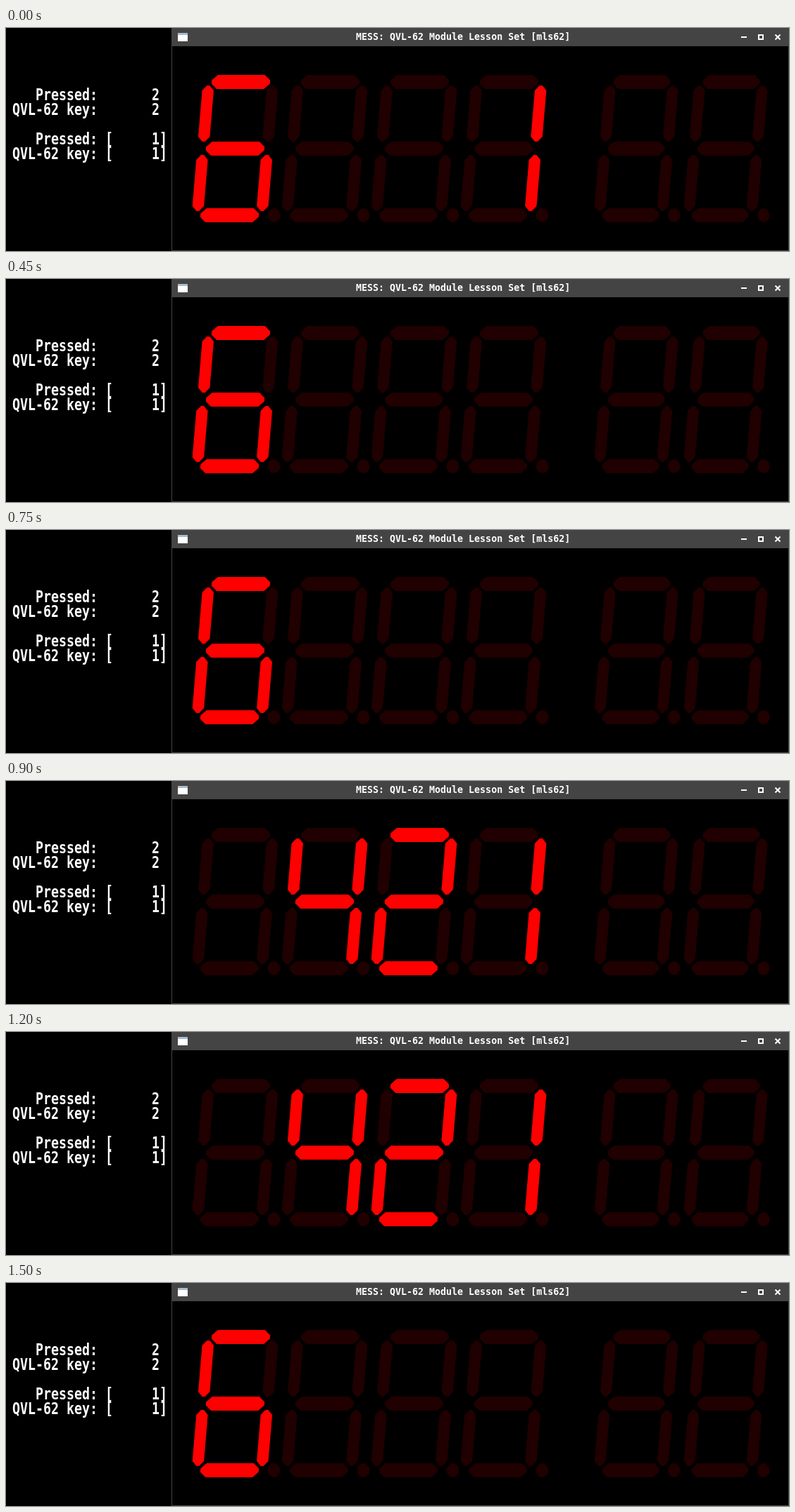
These frames come from a looping animation (1112x318 px, 1.65 s). An HTML page with a canvas:

```html
<!DOCTYPE html>
<html lang="en">
<head>
<meta charset="utf-8">
<title>Seven-segment display</title>
<style>
  html, body { margin: 0; height: 100%; overflow: hidden; background: #000; }
  canvas { display: block; }
</style>
</head>
<body>
<canvas id="stage" width="1112" height="318"></canvas>
<script>
const ctx = document.getElementById('stage').getContext('2d');
const STEP = 150;
const LIT = '#ff0000', DIM = '#200000';
const MONO = '"DejaVu Sans Mono", monospace';

// Four address digits, then two slightly narrower data digits
const places = [
  ...[325.5, 452.5, 579.5, 706.5].map(x => ({ x, width: 1 })),
  ...[895.1, 1022.1].map(x => ({ x, width: 0.975 }))
];
const digits = ['6', '4', '2', '1'];
const glyphs = { 6: 'acdefg', 4: 'bcfg', 2: 'abdeg', 1: 'bc' };

// Which digits the multiplexed display shows at each step
const scan = ['03', '0', '23', '0', '123', '0', '123', '0', '123', '23', '0'];

// Segment centres relative to the digit centre, before the slant
const segments = {
  a: [0, -95], g: [0, 0], d: [0, 95],
  f: [-45.7, -50], b: [45.7, -50],
  e: [-45.7, 49], c: [45.7, 49]
};

function bar(x, y, horizontal) {
  const [half, thick, cap, tip] = horizontal ? [41.5, 10, 8, 2.5] : [40, 8.2, 7, 2];
  const corners = [
    [-half, -tip], [cap - half, -thick], [half - cap, -thick], [half, -tip],
    [half, tip], [half - cap, thick], [cap - half, thick], [-half, tip]
  ];
  ctx.beginPath();
  for (const [u, v] of corners) {
    ctx.lineTo(x + (horizontal ? u : v), y + (horizontal ? v : u));
  }
  ctx.fill();
}

function drawDigit({ x, width }, lit) {
  ctx.save();
  ctx.transform(width, 0, -0.084, 1, x, 172);
  for (const name in segments) {
    ctx.fillStyle = lit.includes(name) ? LIT : DIM;
    bar(...segments[name], 'agd'.includes(name));
  }
  ctx.restore();
  ctx.fillStyle = DIM;
  ctx.beginPath();
  ctx.ellipse(x + 55 * width, 267, 9 * width, 10, 0, 0, Math.PI * 2);
  ctx.fill();
}

function drawKeys() {
  const lines = [
    '   Pressed:       2',
    'QVL-62 key:       2',
    '',
    '   Pressed: [     1]',
    'QVL-62 key: [     1]'
  ];
  ctx.save();
  ctx.scale(1, 1.27);
  ctx.fillStyle = '#fff';
  ctx.font = `bold 18.27px ${MONO}`;
  lines.forEach((line, i) => ctx.fillText(line, 9, (103 + 21 * i) / 1.27));
  ctx.restore();
}

function drawWindow() {
  ctx.fillStyle = '#444';
  ctx.fillRect(235, 0, 877, 26);
  ctx.fillRect(235, 0, 1, 318);
  ctx.fillRect(235, 317, 877, 1);
  ctx.fillRect(1111, 0, 1, 318);

  ctx.fillStyle = '#fff';
  ctx.fillRect(244, 7, 14, 12);
  ctx.fillStyle = '#a8bccf';
  ctx.fillRect(244, 7, 14, 3);

  ctx.fillStyle = '#fff';
  ctx.font = `bold 13.3px ${MONO}`;
  ctx.fillText('MESS: QVL-62 Module Lesson Set [mls62]', 497, 17);

  ctx.fillRect(1044, 12, 8, 2);
  ctx.strokeStyle = '#fff';
  ctx.lineWidth = 2;
  ctx.strokeRect(1069, 10, 6, 6);
  ctx.beginPath();
  ctx.moveTo(1092.5, 9.5);
  ctx.lineTo(1099.5, 16.5);
  ctx.moveTo(1099.5, 9.5);
  ctx.lineTo(1092.5, 16.5);
  ctx.stroke();
}

function draw() {
  const active = scan[Math.floor(performance.now() / STEP) % scan.length];
  ctx.fillStyle = '#000';
  ctx.fillRect(0, 0, 1112, 318);
  drawKeys();
  drawWindow();
  places.forEach((place, i) => drawDigit(place, active.includes(i) ? glyphs[digits[i]] : ''));
  requestAnimationFrame(draw);
}
draw();
</script>
</body>
</html>
```
